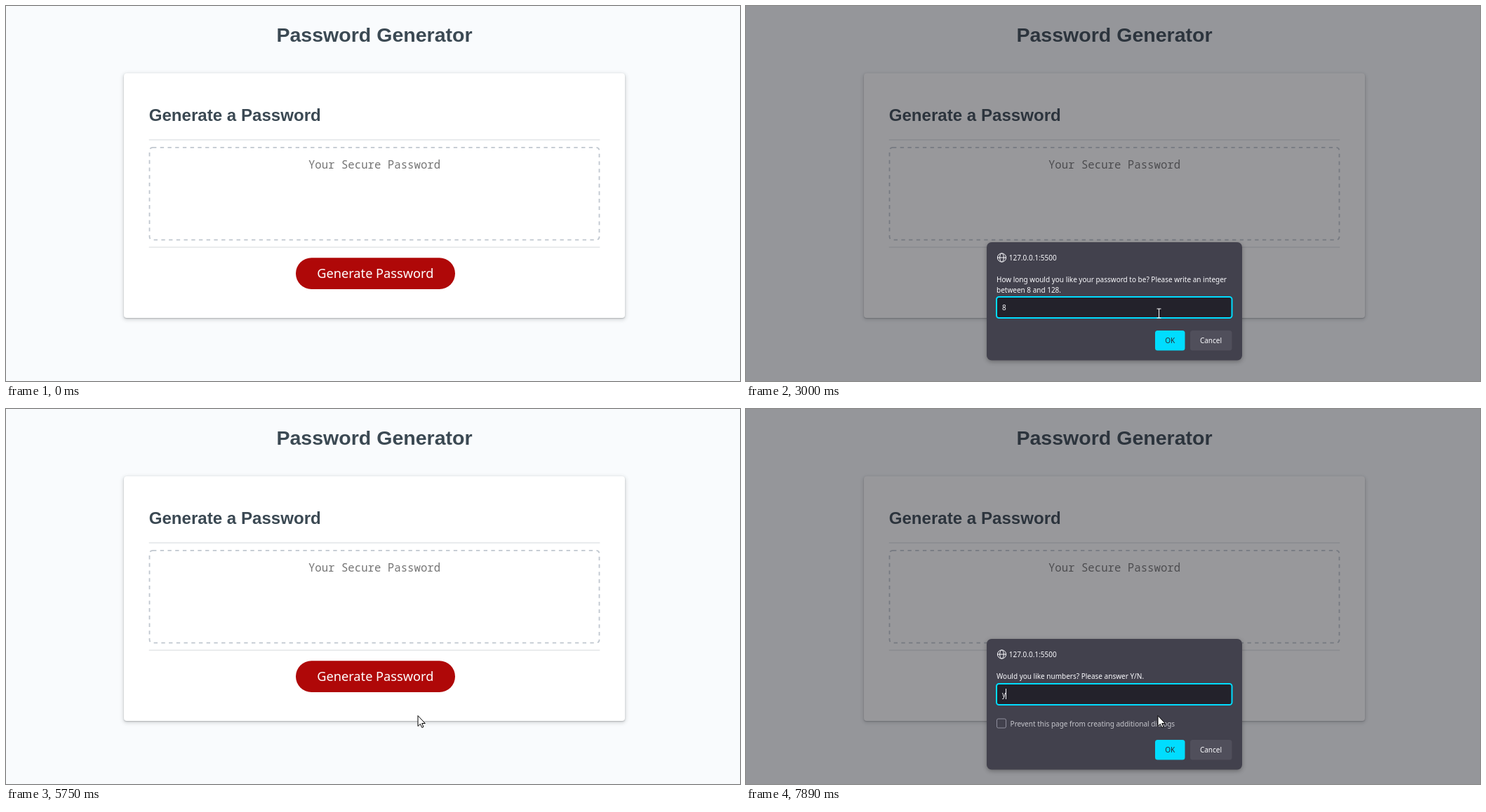
Recreate the animation shown at these times as an HTML page with a canvas. Size 1046 by 535 pixels, loop 8 s.

```html
<!DOCTYPE html>
<html lang="en">
<head>
<meta charset="utf-8">
<title>Password Generator</title>
<style>
  html, body { margin: 0; width: 100%; height: 100%; overflow: hidden; background: #f9fbfd; }
  canvas { display: block; }
</style>
</head>
<body>
<canvas id="stage" width="1046" height="535"></canvas>
<script>
const ctx = document.getElementById('stage').getContext('2d');
const W = 1046, H = 535, LOOP = 8000;
const UI = '10px "Noto Sans", "Open Sans", sans-serif';
const HEADING = '"Liberation Sans", Arial, sans-serif';

// Each dialog: visible span, question, answer and when it is typed, spans in which the caret shows.
const dialogs = [
  { start: 820, end: 3400, first: true, answer: '8', typed: 2730,
    lines: ['How long would you like your password to be? Please write an integer', 'between 8 and 128.'],
    caret: [[820, 1350], [1870, 2400], [2730, 2930]] },
  { start: 3470, end: 5750, answer: 'n', typed: 5210,
    lines: ['Would you like uppercase letters? Please answer Y/N.'],
    caret: [[3470, 4000], [4550, 5080], [5210, 5610]] },
  { start: 5820, end: 7100, answer: 'n', typed: 6680,
    lines: ['Would you like lowercase letters? Please answer Y/N.'],
    caret: [[5820, 6280], [6680, 6830]] },
  { start: 7170, end: LOOP, answer: 'y', typed: 7890,
    lines: ['Would you like numbers? Please answer Y/N.'],
    caret: [[7170, 7630], [7890, LOOP]] }
];

// Pointer hotspot: time, x, y
const path = [
  [70, 640, 530], [300, 610, 450], [520, 583, 396], [700, 579, 388], [890, 579, 388],
  [1100, 583, 405], [1520, 592, 439], [1870, 592, 439], [2070, 590, 438.5],
  [2730, 590, 438.5], [3000, 587, 437]
];

function box(x, y, w, h, r, fill) {
  ctx.beginPath();
  ctx.roundRect(x, y, w, h, r);
  if (fill) {
    ctx.fillStyle = fill;
    ctx.fill();
  }
}

function outline(x, y, w, h, r, color, width) {
  box(x, y, w, h, r);
  ctx.strokeStyle = color;
  ctx.lineWidth = width;
  ctx.stroke();
}

// Casts only the shadow: the shape itself stays off the stage.
function shadow(x, y, w, h, r, dy, blur, color) {
  ctx.save();
  ctx.shadowColor = color;
  ctx.shadowBlur = blur;
  ctx.shadowOffsetX = 3000;
  ctx.shadowOffsetY = dy;
  box(x - 3000, y, w, h, r, '#000');
  ctx.restore();
}

function text(str, x, y, font, color, align = 'left') {
  ctx.font = font;
  ctx.fillStyle = color;
  ctx.textAlign = align;
  ctx.fillText(str, x, y);
}

function drawPage() {
  ctx.fillStyle = '#f9fbfd';
  ctx.fillRect(0, 0, W, H);
  text('Password Generator', 525, 51, `bold 28.56px ${HEADING}`, '#3b4953', 'center');

  shadow(166.2, 94.2, 717.6, 352.6, 6, 1.8, 5.4, 'rgba(60,64,67,.15)');
  shadow(168, 96, 714, 349, 4, 0.9, 1.8, 'rgba(60,64,67,.3)');
  box(168, 96, 714, 349, 4, '#fff');
  text('Generate a Password', 203.7, 164, `bold 24.1px ${HEADING}`, '#3b4953');

  ctx.fillStyle = '#e7e9eb';
  ctx.fillRect(203.7, 190, 642.6, 1.8);
  ctx.fillRect(203.7, 343.3, 642.6, 1.8);

  ctx.setLineDash([5.36, 5.36]);
  outline(204.5, 201.9, 641, 131.8, 4.5, '#c0c7cf', 1.8);
  ctx.setLineDash([]);
  text('Your Secure Password', 525, 232, '15.7px "Noto Sans Mono", "DejaVu Sans Mono", monospace', '#757575', 'center');

  box(413, 359.3, 227, 44.7, 22.3, '#af0808');
  text('Generate Password', 526.3, 388.3, '18.2px "Noto Sans", "Open Sans", sans-serif', '#fff', 'center');
}

function drawGlobe(x, y) {
  ctx.strokeStyle = '#fbfbfe';
  ctx.lineWidth = 1;
  ctx.beginPath();
  ctx.arc(x, y, 6.1, 0, 7);
  ctx.moveTo(x + 2.8, y);
  ctx.ellipse(x, y, 2.8, 6.1, 0, 0, 7);
  ctx.moveTo(x - 6, y);
  ctx.lineTo(x + 6, y);
  ctx.stroke();
}

function drawDialog(d, t) {
  const top = d.first ? 337 : 328;
  const height = d.first ? 168.5 : 186.5;
  const field = d.first ? 414 : 391;
  const buttons = top + height - 42.5;

  ctx.fillStyle = 'rgba(28,27,34,.45)';
  ctx.fillRect(0, 0, W, H);
  shadow(343, top, 364, height, 7, 2, 6, 'rgba(0,0,0,.3)');
  box(343, top, 364, height, 7, '#42414d');

  drawGlobe(364.5, top + 22);
  text('127.0.0.1:5500', 374.7, top + 25.6, UI, '#fbfbfe');
  d.lines.forEach((line, i) => text(line, 357, top + 57 + i * 14.5, UI, '#fbfbfe'));

  box(357, field, 336, 32, 4, '#23222b');
  outline(357, field + 1, 335.5, 30, 3.5, '#00ddff', 2);
  const answer = t >= d.typed ? d.answer : '';
  text(answer, 365, field + 20, UI, '#fbfbfe');
  if (d.caret.some(([on, off]) => t >= on && t < off)) {
    const x = Math.round(365 + ctx.measureText(answer).width);
    ctx.fillRect(x, field + (d.first ? 9 : 8), 1, d.first ? 14 : 15);
  }

  if (!d.first) {
    outline(357.5, 442, 13, 13, 2, '#8f8f9d', 1);
    text('Prevent this page from creating additional dialogs', 376.6, 453, UI, '#c6c6cc');
  }
  box(583, buttons, 42.5, 28.5, 3.5, '#00ddff');
  text('OK', 604.2, buttons + 18, UI, '#2b2a33', 'center');
  box(633, buttons, 59.5, 28.5, 3.5, '#504f5b');
  text('Cancel', 662.5, buttons + 18, UI, '#fbfbfe', 'center');
}

function pointerAt(t) {
  const next = path.findIndex(p => p[0] > t);
  if (next < 0) return path[path.length - 1].slice(1);
  const [t0, x0, y0] = path[next - 1], [t1, x1, y1] = path[next];
  const k = (t - t0) / (t1 - t0);
  return [x0 + (x1 - x0) * k, y0 + (y1 - y0) * k];
}

const arrow = new Path2D('M0 0V15L3.4 11.8L5.8 17L8 16L5.7 11H10.3Z');
const hand = new Path2D('M-1.5 1Q0 -1 1.5 1V6Q3 5 4 6.5Q5.5 5.7 6.5 7.3Q9 7 9 9V13L7 18H0L-5 11Q-5 8 -1.5 10.5Z');
const beam = new Path2D('M-3 -6.5H3M-3 6.5H3M0 -6.5V6.5');

function drawPointer(t, dialog) {
  const [x, y] = pointerAt(t);
  const overField = dialog && dialog.first && y > 414;
  const overButton = !dialog && x > 413 && x < 640 && y > 359 && y < 404;
  ctx.save();
  ctx.lineWidth = 1;
  if (overField) {
    ctx.translate(Math.round(x) + 1.5, Math.round(y) + 1.5);
    ctx.strokeStyle = '#fff';
    ctx.stroke(beam);
  } else {
    const shape = overButton ? hand : arrow;
    ctx.translate(x, y + 0.5);
    ctx.fillStyle = '#fff';
    ctx.strokeStyle = '#000';
    ctx.fill(shape);
    ctx.stroke(shape);
  }
  ctx.restore();
}

function render(t) {
  const dialog = dialogs.find(d => t >= d.start && t < d.end);
  drawPage();
  if (dialog) drawDialog(dialog, t);
  if (t >= path[0][0]) drawPointer(t, dialog);
}

const began = performance.now();
function tick() {
  render((performance.now() - began) % LOOP);
  requestAnimationFrame(tick);
}
tick();
</script>
</body>
</html>
```
